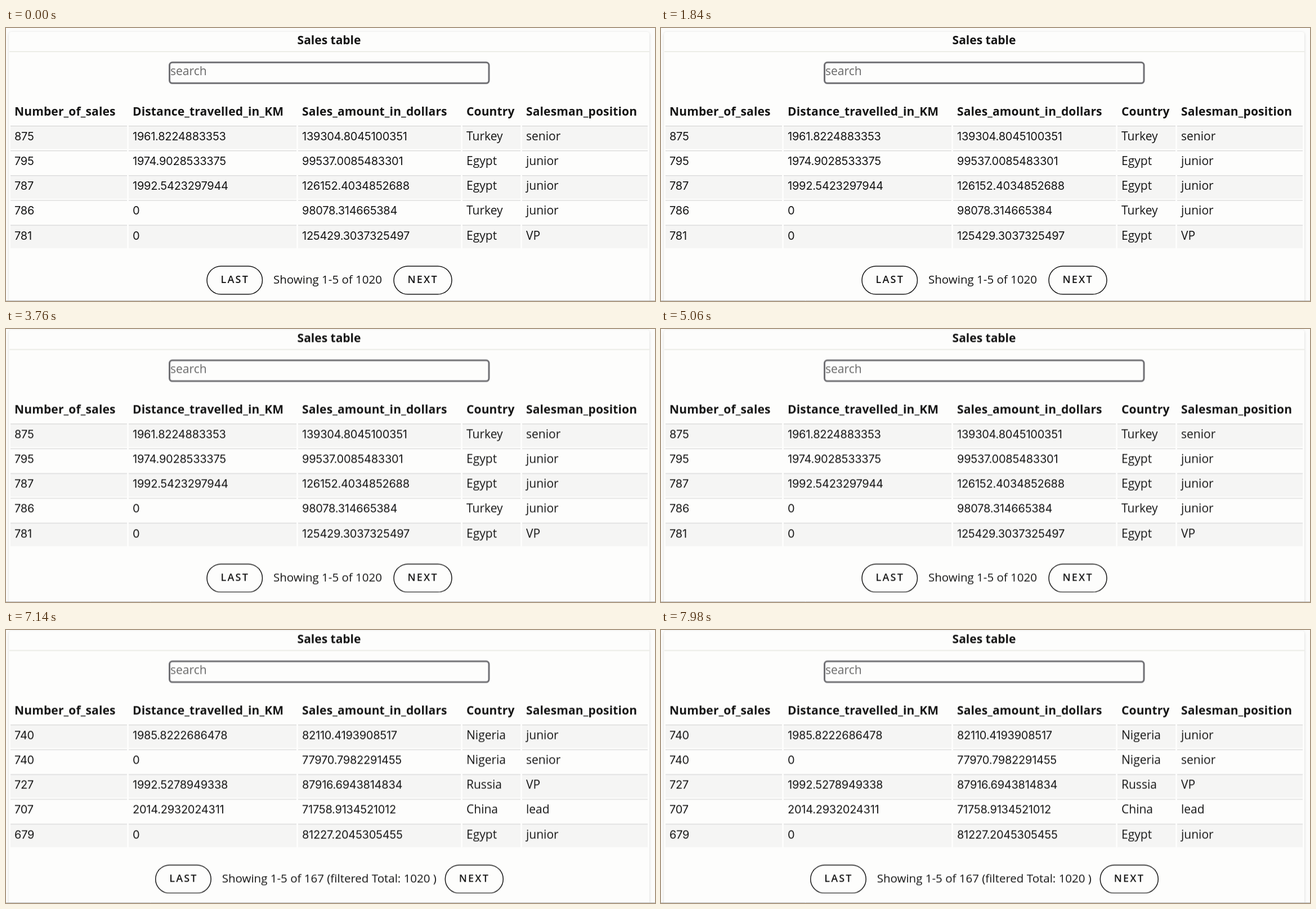
Animation, 1153 px wide and 486 px high, one loop 8 s. Source, as an HTML page:

```html
<!DOCTYPE html>
<html lang="en">
<head>
<meta charset="utf-8">
<title>Sales table</title>
<style>
  html, body { margin: 0; width: 100%; height: 100%; overflow: hidden; background: #fcfcfb; }
  svg { display: block; width: 1153px; height: 486px; }
  text { font: 21px "Open Sans", "Noto Sans", sans-serif; fill: #141414; white-space: pre; }
  .bold { font-weight: 700; }
  .head { font-weight: 700; letter-spacing: .14px; }
  .num { font: 20px Inter, sans-serif; letter-spacing: -.25px; }
  .info { font-size: 20.5px; }
  .hint { fill: #686868; }
  .label { font-size: 18px; font-weight: 600; letter-spacing: 2.2px; }
  .pill { fill: #fdfdfc; stroke: #141414; stroke-width: 1.5; }
  .field { fill: #fdfdfc; stroke: #707074; stroke-width: 3; animation: focus 8s step-end infinite; }
  .page { animation: scroll 8s linear infinite; }
  .all { animation: all 8s step-end infinite; }
  .filtered { animation: filtered 8s step-end infinite; }
  @keyframes focus {
    0% { stroke: #707074; }
    31.25% { stroke: #0d50bd; }
    41.75%, 100% { stroke: #707074; }
  }
  @keyframes scroll {
    0%, 42% { transform: translateY(0); animation-timing-function: ease-out; }
    44%, 100% { transform: translateY(-5.5px); }
  }
  @keyframes all { 0% { opacity: 1; } 67.25%, 100% { opacity: 0; } }
  @keyframes filtered { 0% { opacity: 0; } 67.25%, 100% { opacity: 1; } }
</style>
</head>
<body>
<svg viewBox="0 0 1153 486">
  <defs>
    <filter id="shadow" x="-5%" y="-5%" width="110%" height="110%">
      <feDropShadow dx="0" dy="1" stdDeviation="2" flood-color="#000" flood-opacity=".16"/>
    </filter>
  </defs>
  <rect width="1153" height="486" fill="#fcfcfb"/>
  <g class="page">
    <rect x="5.5" y="7" width="1137.5" height="520" rx="5" fill="#fdfdfc" filter="url(#shadow)"/>
    <path d="M6 42H1143" stroke="#dcddd3"/>
    <text class="bold" x="574" y="29" text-anchor="middle">Sales table</text>
    <rect class="field" x="290.5" y="61.3" width="567.5" height="37" rx="5"/>
    <text class="hint" x="292" y="84.3">search</text>
    <g id="grid"></g>
    <g class="all" id="all"></g>
    <g class="filtered" id="filtered"></g>
  </g>
  <path d="M0 485.5H1153" stroke="#b9b9b9"/>
</svg>
<script>
  const columns = [
    { name: "Number_of_sales", x: 8, w: 207 },
    { name: "Distance_travelled_in_KM", x: 218, w: 298 },
    { name: "Sales_amount_in_dollars", x: 519, w: 289 },
    { name: "Country", x: 811, w: 103 },
    { name: "Salesman_position", x: 917, w: 223 }
  ];
  const views = {
    all: {
      info: "Showing 1-5 of 1020", shift: 0,
      rows: [
        "875 1961.8224883353 139304.8045100351 Turkey senior",
        "795 1974.9028533375 99537.0085483301 Egypt junior",
        "787 1992.5423297944 126152.4034852688 Egypt junior",
        "786 0 98078.314665384 Turkey junior",
        "781 0 125429.3037325497 Egypt VP"
      ]
    },
    filtered: {
      info: "Showing 1-5 of 167 (filtered Total: 1020 )", shift: 91.3,
      rows: [
        "740 1985.8222686478 82110.4193908517 Nigeria junior",
        "740 0 77970.7982291455 Nigeria senior",
        "727 1992.5278949338 87916.6943814834 Russia VP",
        "707 2014.2932024311 71758.9134521012 China lead",
        "679 0 81227.2045305455 Egypt junior"
      ]
    }
  };
  const top0 = 174.5, pitch = 44.15, pad = 7;

  const text = (x, y, s, cls = "") => `<text class="${cls}" x="${x}" y="${y}">${s}</text>`;
  const button = (x, w, s) =>
    `<rect class="pill" x="${x}" y="424" width="${w}" height="50" rx="25"/>` + text(x + 24.5, 454.3, s, "label");
  const fill = (id, html) => { document.getElementById(id).innerHTML = html; };

  let grid = "";
  for (const { name, x, w } of columns) {
    grid += text(x + pad, 155.5, name, "head");
    for (let r = 0; r < 5; r++) {
      const y = top0 + r * pitch;
      if (r % 2 === 0) grid += `<rect x="${x}" y="${y}" width="${w}" height="41" fill="#f5f5f4"/>`;
      grid += `<path d="M${x} ${y}h${w}" stroke="#cfcfcf"/>`;
    }
  }
  fill("grid", grid);

  for (const [id, { info, shift, rows }] of Object.entries(views)) {
    const cells = rows.map((row, r) => row.split(" ").map((s, c) =>
      text(columns[c].x + pad, 200 + r * pitch, s, c < 3 ? "num" : "")).join(""));
    fill(id, cells.join("") + button(357 - shift, 98.5, "LAST") +
      text(475 - shift, 455, info, "info") + button(689 + shift, 103, "NEXT"));
  }
</script>
</body>
</html>
```
